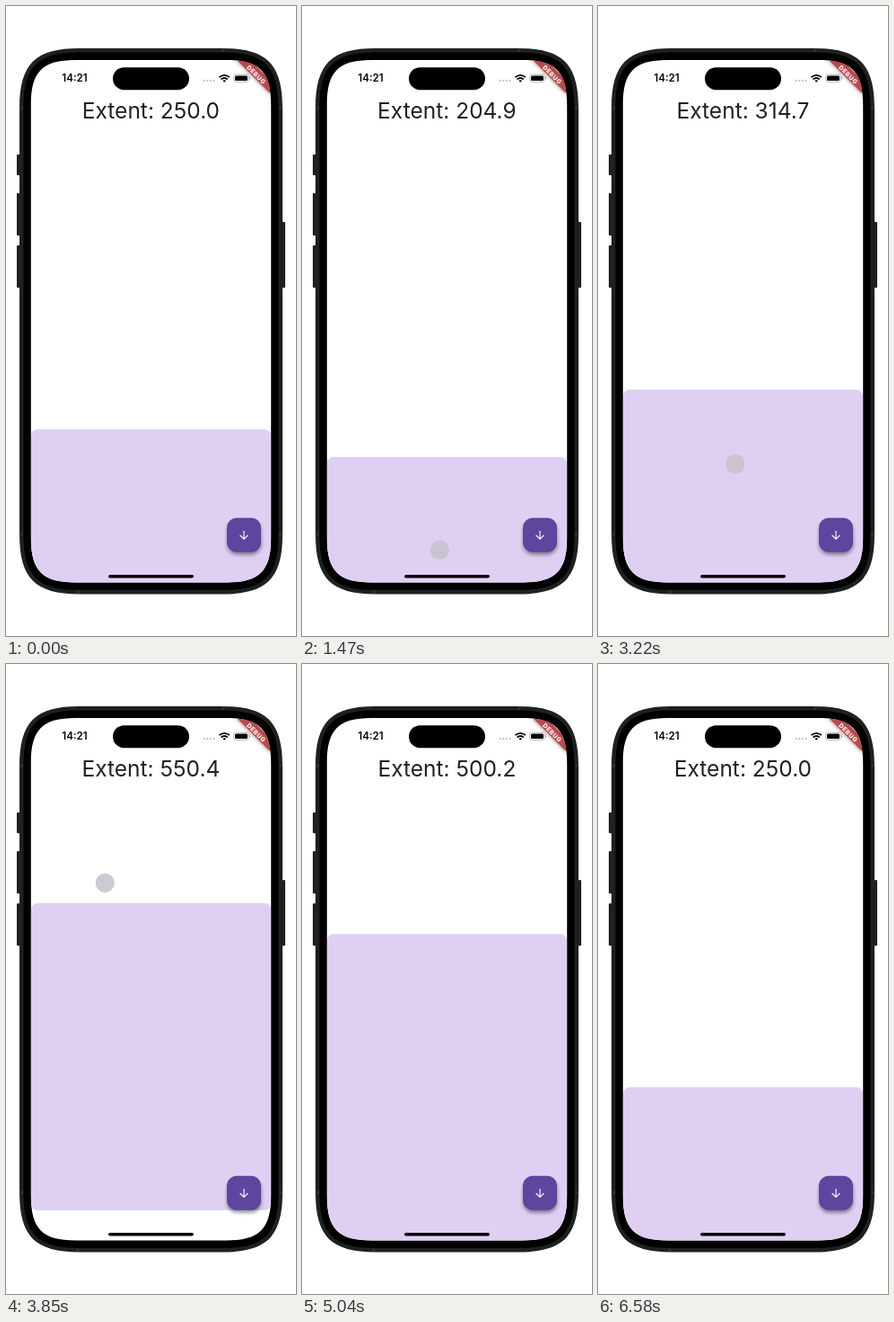
These frames come from a looping animation (323 px wide and 700 px high, 7.6 s). An HTML page:

```html
<!DOCTYPE html>
<html lang="en">
<head>
<meta charset="utf-8">
<title>Bottom sheet extent</title>
<style>
  html, body { margin: 0; width: 100%; height: 100%; overflow: hidden; background: #fff; }
  svg { display: block; width: 323px; height: 700px; }
  text { font-family: Inter, Roboto, sans-serif; text-anchor: middle; }
</style>
</head>
<body>
<svg viewBox="0 0 323 700">
  <defs>
    <clipPath id="screen"><path id="glass"/></clipPath>
    <filter id="soft" x="-40%" y="-40%" width="180%" height="180%"><feGaussianBlur stdDeviation="2.2"/></filter>
  </defs>

  <!-- phone body -->
  <g fill="#1f2120">
    <rect x="12" y="165" width="5" height="23" rx="1"/>
    <rect x="12" y="208" width="5" height="47" rx="1"/>
    <rect x="12" y="266" width="5" height="47" rx="1"/>
    <rect x="306" y="240" width="5" height="73" rx="1"/>
    <path id="body"/>
  </g>
  <path d="M15.5 113h4M303.5 113h4M15.5 587h4M303.5 587h4M242 47.5v4M80 649v4" stroke="#303231" stroke-width="3"/>
  <path id="bezel"/>

  <g clip-path="url(#screen)">
    <rect x="27" y="59" width="269" height="583" fill="#fff"/>
    <text id="label" x="161.4" y="124.6" font-size="24.5" fill="#222026"></text>
    <rect id="sheet" x="27.8" width="267.4" height="341.4" rx="7.5" fill="#dfcff2"/>

    <!-- floating button -->
    <rect x="246.5" y="572.5" width="37.5" height="37" rx="11" fill="#000" opacity=".45" filter="url(#soft)"/>
    <rect x="246" y="568.7" width="38" height="38" rx="11" fill="#5d469d"/>
    <path d="M265 583.1v9.2M260.6 588l4.4 4.4 4.4-4.4" fill="none" stroke="#f1eef7" stroke-width="1.25"/>

    <!-- status bar -->
    <text x="76.5" y="84.4" font-size="11.6" font-weight="600">14:21</text>
    <rect x="119" y="68.2" width="85" height="25" rx="12.5"/>
    <g fill="#c9c9cb">
      <circle cx="220.6" cy="83" r="1.2"/><circle cx="224.3" cy="83" r="1.2"/>
      <circle cx="228" cy="83" r="1.2"/><circle cx="231.7" cy="83" r="1.2"/>
    </g>
    <g fill="none" stroke="#000" stroke-width="1.7">
      <path d="M237.5 79.2q5.7-4.8 11.4 0M239.6 81.5q3.6-3 7.2 0"/>
    </g>
    <path d="M243.2 84.8l-1.9-1.9q1.9-1.4 3.8 0z"/>
    <rect x="253.7" y="76.1" width="16.6" height="8.2" rx="2.6" fill="none" stroke="#a3a3a5" stroke-width=".8"/>
    <rect x="255" y="77.4" width="14" height="5.6" rx="1.5"/>
    <path d="M271.4 79v2.6" stroke="#a3a3a5"/>

    <!-- debug ribbon -->
    <path d="M256 60H270L295 85V99z" fill="#000" opacity=".4" filter="url(#soft)"/>
    <path d="M256 59H271L296 84V99z" fill="#ba494c"/>
    <text transform="translate(278.8 76.4) rotate(45)" y="2.5" font-size="7" letter-spacing=".5" font-weight="900" fill="#f6e8e9">DEBUG</text>

    <rect x="114" y="631.9" width="95" height="3.6" rx="1.8"/>
    <circle id="touch" fill="#c5c3cd"/>
  </g>
</svg>
<script>
const LOOP = 7600, STEP = 70, END = 6580;
const BOTTOM = 640.7, SCALE = 0.6815;
const $ = id => document.getElementById(id);
const label = $("label"), sheet = $("sheet"), touch = $("touch");

// Box with continuous corners that ease into the straight sides
function smoothBox(x, y, w, h, r) {
  const len = 1.32 * r, c = len - 0.345 * r;
  return `M${x + len} ${y}h${w - 2 * len}c${c} 0 ${len} ${len - c} ${len} ${len}`
    + `v${h - 2 * len}c0 ${c} ${c - len} ${len} ${-len} ${len}`
    + `h${2 * len - w}c${-c} 0 ${-len} ${c - len} ${-len} ${-len}`
    + `v${2 * len - h}c0 ${-c} ${len - c} ${-len} ${len} ${-len}z`;
}
$("body").setAttribute("d", smoothBox(15, 47, 293, 606.5, 50.5));
$("bezel").setAttribute("d", smoothBox(19.5, 51.5, 284, 597.5, 46));
$("glass").setAttribute("d", smoothBox(27.8, 60, 267.4, 580.5, 37.5));

// rows: time, extent, touch x, touch y
const pull = [
  [280, 250, 154, 520], [350, 249, 154, 523], [700, 236, 154, 551],
  [1100, 219, 154, 580], [1470, 204.9, 153.5, 604.5], [1660, 194, 153, 619]
];
const lift = [
  [2660, 250, 155, 591.5], [2940, 250, 155, 591.5], [3220, 314.7, 152.8, 509],
  [3430, 495, 136, 350], [3640, 540, 119, 268], [3850, 550.4, 110.3, 243.3],
  [4360, 556, 106, 230]
];
const tap = [[5600, 500, 275.5, 587.5], [5950, 500, 275.5, 587.5]];

// Smooth interpolation without overshoot
function along(rows, col, t) {
  const n = rows.length;
  if (t <= rows[0][0]) return rows[0][col];
  if (t >= rows[n - 1][0]) return rows[n - 1][col];
  let i = 0;
  while (t >= rows[i + 1][0]) i++;
  const slope = k => (rows[k + 1][col] - rows[k][col]) / (rows[k + 1][0] - rows[k][0]);
  const tangent = k => {
    if (k === 0) return slope(0);
    if (k === n - 1) return slope(n - 2);
    const a = slope(k - 1), b = slope(k);
    return a * b > 0 ? 2 * a * b / (a + b) : 0;
  };
  const [a, b] = [rows[i], rows[i + 1]], h = b[0] - a[0];
  const u = (t - a[0]) / h, v = 1 - u;
  return a[col] * (1 + 2 * u) * v * v + b[col] * u * u * (3 - 2 * u)
    + h * u * v * (v * tangent(i) - u * tangent(i + 1));
}

// Overdamped spring, remaining share of the initial offset
function settle(ms) {
  const s = ms / 1000, slow = 9.07, fast = 22.04;
  return (fast * Math.exp(-slow * s) - slow * Math.exp(-fast * s)) / (fast - slow);
}

const ease = u => u < 0.5 ? 2 * u * u : 1 - 2 * (1 - u) * (1 - u);

function extentAt(t) {
  if (t < 1660) return along(pull, 1, t);
  if (t < 2660) return 250 - 56 * settle(t - 1660);
  if (t < 4360) return along(lift, 1, t);
  if (t < 5900) return 500 + 56 * settle(t - 4360);
  return 500 - 250 * ease(Math.min(1, (t - 5900) / 660));
}

function draw(t) {
  const extent = extentAt(t);
  label.textContent = "Extent: " + extent.toFixed(1);
  sheet.setAttribute("y", (BOTTOM - extent * SCALE).toFixed(2));

  const path = [pull, lift, tap].find(p => t >= p[0][0] && t < p[p.length - 1][0]);
  touch.setAttribute("visibility", path ? "visible" : "hidden");
  if (!path) return;
  const grow = Math.max(0, 1 - (t - path[0][0]) / STEP);
  touch.setAttribute("cx", along(path, 2, t));
  touch.setAttribute("cy", along(path, 3, t));
  touch.setAttribute("r", 10.6 + 4 * grow);
  touch.setAttribute("opacity", 0.88 - 0.45 * grow);
}

const start = performance.now();
function tick() {
  const t = (performance.now() - start) % LOOP;
  draw(Math.min(END, Math.floor(t / STEP) * STEP));
  requestAnimationFrame(tick);
}
tick();
</script>
</body>
</html>
```
